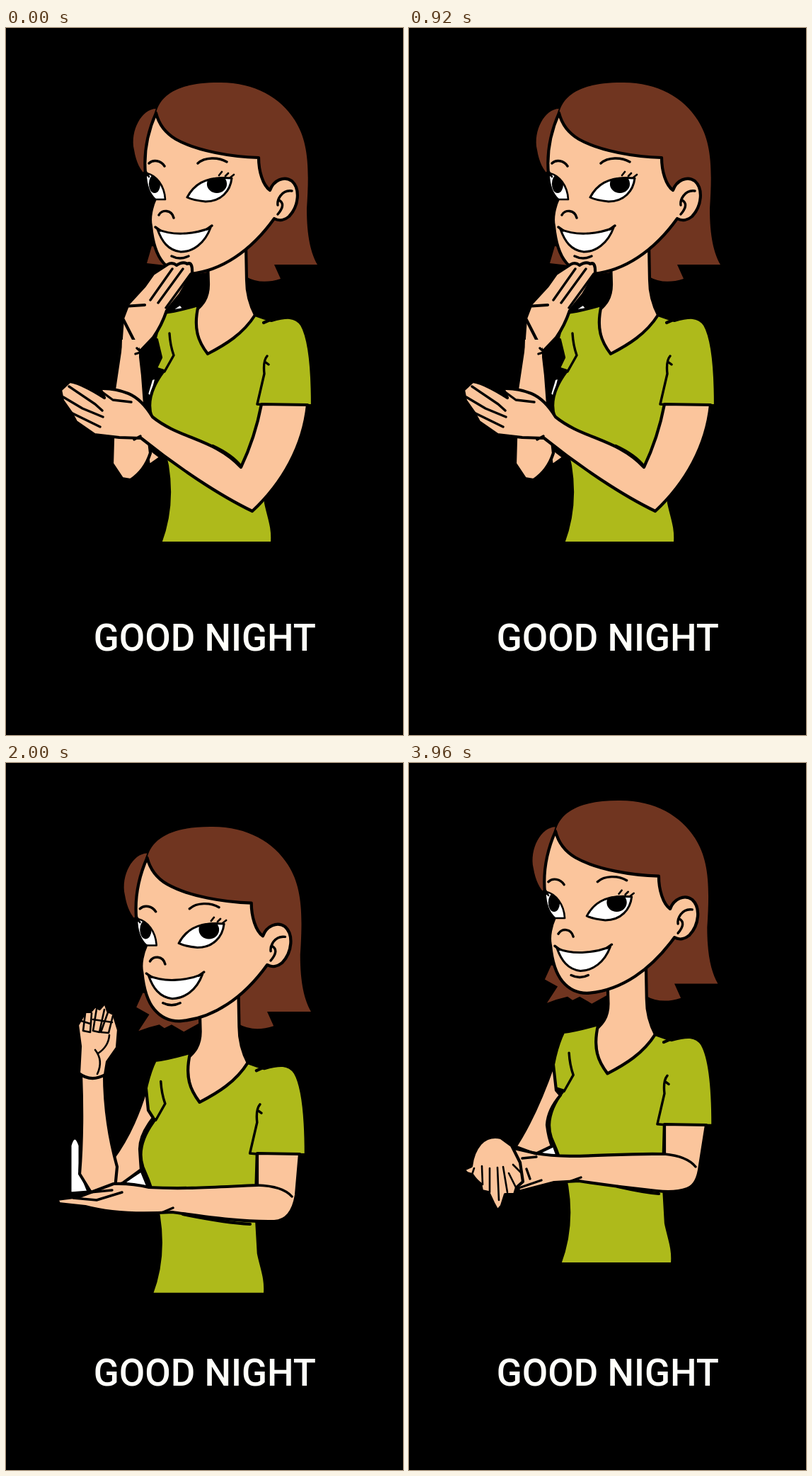
Write an HTML page that moves like this. It is 561 px wide and 998 px high and loops after 4000 ms.

```html
<!DOCTYPE html>
<html lang="en">
<head>
<meta charset="utf-8">
<title>Good night</title>
<style>
html, body { margin: 0; width: 100%; height: 100%; overflow: hidden; background: #000; }
svg { display: block; width: 100%; height: 100%; }
path, ellipse { stroke: #000; stroke-width: 4.2; stroke-linejoin: round; stroke-linecap: round; }
.skin { fill: #fbc59c; }
.hair { fill: #703520; paint-order: stroke; }
.shirt { fill: #aeba1b; }
.white { fill: #fff; stroke-width: 3; }
.line { fill: none; stroke-width: 3.4; }
.thin { fill: none; stroke-width: 2.6; }
.pose { visibility: hidden; animation: show 4s step-end infinite; }
.touch { animation-delay: -3s; }
.raise { animation-delay: -2s; }
.rest { animation-delay: -1s; }
@keyframes show { 0% { visibility: visible; } 25%, 100% { visibility: hidden; } }
text { font: 500 52.9px Roboto, sans-serif; fill: #fffffa; text-anchor: middle; }
</style>
</head>
<body>
<svg viewBox="0 0 561 998">
<defs>
  <path id="locks" class="hair" d="M206 308L197 328L215 338L200 361Q215 355 229 352L236 357L246 352L263 362L288 348L270 320Z"/>
  <clipPath id="eyeL"><path d="M199 205C212 208 224 222 225 242L212 241C204 234 199 222 199 205Z"/></clipPath>
  <clipPath id="eyeR"><path d="M255 239C263 223 279 207 320 211C318 230 304 246 282 246C272 245 264 243 255 239Z"/></clipPath>
  <g id="body">
    <!-- hair -->
    <path class="hair" d="M212 114C192 114 175 145 181 172C184 190 190 201 198 208L230 150Z"/>
    <path class="hair" d="M212 120C219 91 250 77 300 77C350 76 388 98 408 130C427 160 429 195 425 255C425 295 431 318 440 334L379 334L388 354Q360 363 339 351L320 200L235 165Z"/>
    <!-- neck and shirt -->
    <path class="skin" d="M285 325L286 362C286 382 277 391 269 398C266 430 274 450 285 461C312 448 338 432 353 407C344 390 340 375 340 355L339 305Z"/>
    <path class="shirt" d="M272 391C258 395 240 400 223 402C214 420 207 450 204 478L223 484C207 505 198 527 206 550C215 570 224 596 228 618C234 655 232 690 218 727H376C378 705 371 690 367 670L363 600L365 532L433 533C433 490 430 440 418 419C409 406 396 407 375 413L352 405C335 432 310 447 285 460C272 443 264 425 272 391Z"/>
    <path class="line" d="M231 431Q232 448 237 462L224 485M369 463Q363 470 365 488L355 531L366 532M367 472L371 475"/>
    <path d="M364 416Q371 413 380 409" fill="none" stroke-width="6"/>
    <!-- face -->
    <path class="skin" d="M212 120C201 145 194 172 197 205C198 222 203 235 211 241C206 252 202 268 205 280C207 300 211 318 222 331C233 344 247 348 260 347C304 343 346 315 379 269C386 273 394 271 400 266C414 251 416 227 404 216C393 208 378 215 373 229C363 222 357 202 357 183C320 182 270 174 240 157Q218 144 212 120Z"/>
    <path class="line" d="M404 230C389 228 383 243 384 250M386 243Q396 249 384 263"/>
    <path class="line" d="M202 191C208 185 219 187 224 195M271 191C281 182 300 182 312 189M216 264C220 256 234 256 237 268M234 322Q246 328 258 322"/>
    <g clip-path="url(#eyeL)"><path fill="#fff" stroke="none" style="stroke:none" d="M190 200H230V245H190Z"/><ellipse cx="210" cy="220" rx="6" ry="11"/></g>
    <path class="thin" d="M199 205C212 208 224 222 225 242H212"/>
    <path class="white" d="M256 239C264 224 279 208 319 212C317 230 304 245 282 245C272 244 264 243 256 239Z"/>
    <g clip-path="url(#eyeR)"><ellipse cx="298" cy="220" rx="12" ry="11"/></g>
    <path class="thin" d="M301 208L305 203M310 209L314 205M317 211L322 207M199 208L195 204M202 210L198 203"/>
    <path class="white" d="M214 284C234 293 264 292 289 282C281 304 264 316 247 316C229 314 220 301 214 284Z"/>
    <path class="line" d="M211 281L218 286M284 284L291 279"/>
  </g>
</defs>

<g class="pose">
  <path class="hair" d="M206 308L199 332L225 335L250 350L285 345L250 315Z"/>
  <path class="skin" d="M198 590L219 606L202 618Z"/>
  <path class="white" d="M233 399L246 390L252 397ZM196 498L212 494L205 522L197 514Z"/>
  <use href="#body"/>
  <path d="M190 455L213 440L219 465L207 490L198 520Z"/>
  <path class="skin" d="M166 395L162 450L153 510L150 615L164 636L176 638Q196 625 204 600L196 530L193 490L189 455Z"/>
  <path class="skin" d="M165 410L173 389L196 364L208 347L228 334Q235 330 241 335Q250 329 256 333Q264 329 263 347L246 376L227 399Q220 420 208 437L189 457Z"/>
  <path style="stroke:none" class="skin" d="M164 440L188 440V470H163Z"/>
  <path class="line" d="M235 340L204 384M250 340L215 388M261 347L226 395M185 452L195 461M183 460L196 456"/>
  <path d="M166 393L196 391" fill="none" stroke-width="6"/>
  <path class="skin" d="M361 531L426 532C420 590 391 642 348 682C302 660 242 620 191 579L160 578L125 574L99 556L92 543L80 526L77 511L90 499Q106 501 139 522L133 509Q153 508 173 516Q192 524 207 549C245 580 295 580 332 620Q352 578 361 531Z"/>
  <path class="line" d="M89 506L126 531L136 540M81 521L108 537L137 549M92 543L133 563M136 514L151 525L177 528M181 581L190 576"/>
  <path d="M292 590Q320 603 332 619" fill="none" stroke-width="6"/>
</g>

<g class="pose touch">
  <path class="white" d="M182 490L196 495L184 517Z"/>
  <g transform="translate(-25.7 6.3) scale(1.0093)"><use href="#locks"/><use href="#body"/></g>
  <path class="skin" d="M91 550Q99 583 130 616L170 670Q184 688 202 696Q208 665 197 631L151 602L134 580Z"/>
  <path class="skin" d="M179 587L195 589L196 627L179 617Z"/>
  <path class="white" d="M147 585L178 588L179 617Q160 614 148 603L139 600Z"/>
  <path class="skin" d="M101 510L103 487L111 480L116 474L123 478L132 481L137 498L144 513L130 530Z"/>
  <path class="thin" d="M111 483L113 506M122 480L124 508M131 483L133 510"/>
  <path class="skin" d="M337 543L400 544C398 601 387 650 361 693C306 670 250 630 200 588L165 587L130 581L106 565L98 549L82 534L77 515L94 500L138 520L133 511Q156 512 184 525Q205 536 213 565C250 598 305 598 335 628Q341 590 337 543Z"/>
  <path class="line" d="M89 510L136 540M81 524L136 551M98 549L137 570M136 516L151 528L182 532"/>
  <path d="M298 604Q321 611 335 627" fill="none" stroke-width="6"/>
</g>

<g class="pose raise">
  <path class="white" d="M165 593L191 576L200 598Z"/>
  <g transform="translate(-15.8 11.8) scale(1.0154)"><use href="#locks"/><use href="#body"/></g>
  <path class="skin" d="M198 460L201 490L208 501Q189 525 189 545Q190 562 191 574L165 593L154 597L150 560Q180 520 198 460Z"/>
  <path class="white" d="M91 607V540Q97 520 104 540V575L116 605Z"/>
  <path class="skin" d="M106 440L139 438Q139 505 157 570L154 601L120 606L104 580Q109 520 106 440Z"/>
  <path class="skin" d="M103 438L105 400L101 370L112 351L119 351L126 343L132 347L140 338L144 350L152 354L159 377L157 402L143 422L140 440Q120 451 103 438Z"/>
  <path class="thin" d="M112 353L109 378L119 380L121 353M128 347L123 378L132 380L139 348M144 352L134 380L145 381L151 357M146 384Q145 400 130 410M126 405Q138 420 129 439M106 364L119 368M123 362L150 366"/>
  <path class="skin" d="M355 551L415 552L410 610Q404 646 379 647C330 648 280 640 235 634Q160 639 112 626L75 622L72 616L104 612L152 594Q177 593 202 599C255 602 305 598 355 596Z"/>
  <path class="line" d="M355 596Q391 597 404 612M95 614L128 617L164 606M108 607L150 603M222 634L236 628"/>
  <path d="M250 637Q310 649 345 651" fill="none" stroke-width="5"/>
</g>

<g class="pose rest">
  <path class="white" d="M181 550L204 540L210 557Z"/>
  <g transform="translate(-6.3 -24.5) scale(1.0062)"><use href="#locks"/><use href="#body"/></g>
  <path class="skin" d="M204 426L208 462L214 469Q196 490 195 511Q197 528 202 541L181 551L146 548Q177 503 204 426Z"/>
  <path class="skin" d="M361 510L420 511L411 568Q408 596 393 601Q376 607 350 604C310 600 272 595 240 590L205 592L155 605L149 561L144 543L179 551C230 560 290 550 361 552Z"/>
  <path class="line" d="M361 552Q393 555 405 570M145 539L180 552M160 558L180 556M166 573L171 587M229 590L243 585M155 600L187 589"/>
  <path d="M295 598Q330 606 353 608" fill="none" stroke-width="5"/>
  <path class="skin" d="M88 569L77 574L82 579L89 581Q95 590 101 594L103 604L112 606L119 621L125 632L131 625L136 609L149 609L152 599L161 591L157 564L145 540L130 529Q113 525 101 537Q90 550 88 569Z"/>
  <path class="thin" d="M103 569L104 595M114 572L114 606M125 571L127 617M133 570L139 606M141 579L151 599M92 572L89 581M147 567L158 578"/>
</g>

<text x="280.8" y="879">GOOD NIGHT</text>
</svg>
</body>
</html>
```
